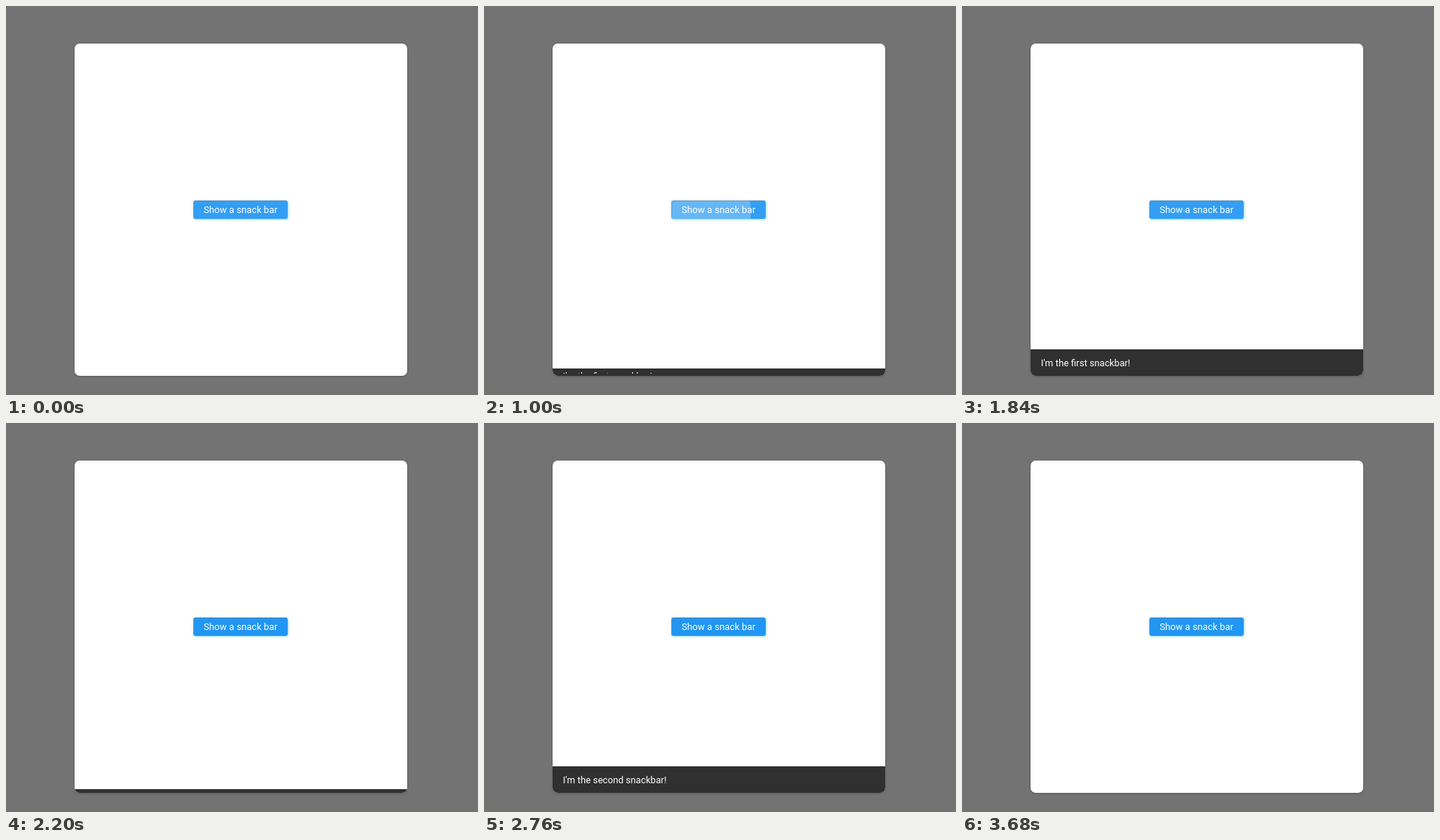
An HTML page for the animation above (4 s loop, 640 by 528 pixels).

```html
<!DOCTYPE html>
<html lang="en">
<head>
<meta charset="utf-8">
<title>Snack bar</title>
<style>
  html, body { margin: 0; width: 100%; height: 100%; overflow: hidden; }
  body { position: relative; background: #737373; font: 12.7px/15px Roboto, sans-serif; color: #fff; }
  #card {
    position: absolute; left: 93px; top: 51px; width: 451px; height: 451px;
    border-radius: 7px; background: #fff; box-shadow: 0 1px 3px rgba(0, 0, 0, .22);
  }
  #clip { position: absolute; inset: 0; border-radius: 7px; overflow: hidden; }
  #button {
    position: absolute; left: 161px; top: 213px; width: 128px; height: 25px;
    border-radius: 3px; overflow: hidden; text-align: center; line-height: 25px; font-size: 12.75px;
  }
  #glow {
    position: absolute; left: 161px; top: 213px; width: 128px; height: 25px; border-radius: 3px;
    box-shadow: 1px 1px 3px #9fe6f8, 0 0 3px rgba(110, 120, 130, .35);
  }
  #edge {
    position: absolute; inset: 0; border-radius: 3px;
    box-shadow: inset 1px 1px 0 rgba(120, 135, 150, .6);
  }
  #ripple { position: absolute; left: 48px; top: 14px; border-radius: 50%; background: #fff; }
  #label { position: absolute; inset: 0; white-space: nowrap; }
  #bar { position: absolute; left: 0; right: 0; bottom: 0; background: #303030; overflow: hidden; }
  #slot { position: absolute; left: 14px; right: 14px; top: 3.5px; bottom: 3.5px; overflow: hidden; }
  #message { position: absolute; left: 0; top: 0; white-space: nowrap; }
</style>
</head>
<body>
<div id="card">
  <div id="glow"></div>
  <div id="button">
    <div id="ripple"></div>
    <div id="edge"></div>
    <div id="label">Show a snack bar</div>
  </div>
  <div id="clip">
    <div id="bar"><div id="slot"><div id="message"></div></div></div>
  </div>
</div>
<script>
const LOOP = 4000, STEP = 40, BAR = 36, PAD = 3.5, LINE = 15;
const bars = [
  { text: "I'm the first snackbar!", enter: 946, leave: 2014 },
  { text: "I'm the second snackbar!", enter: 2230, leave: 3460 }
];
const ripples = [
  { press: 835, release: 1060, end: 1360 },
  { press: 1835, release: 1990, end: 2190 }
];
const $ = id => document.getElementById(id);
const ramp = (t, start, end) => Math.min(1, Math.max(0, (t - start) / (end - start)));
const easeOut = p => Math.sin(p * Math.PI / 2);

function drawBar(t) {
  const { text, enter, leave } = t < bars[1].enter ? bars[0] : bars[1];
  const h = BAR * (easeOut(ramp(t, enter, enter + 300)) - ramp(t, leave, leave + 216));
  $("bar").style.height = Math.max(0, h) + "px";
  $("bar").style.visibility = h > 0 ? "visible" : "hidden";
  if ($("message").textContent !== text) $("message").textContent = text;
  const y = Math.max(0, (h - LINE) / 2 - PAD);
  $("message").style.transform = `translateY(${y}px)`;
}

function drawButton(t) {
  const hover = 1 - ramp(t, 2000, 2190);
  const mix = (a, b) => Math.round(a + (b - a) * hover);
  $("button").style.background = `rgb(${mix(33, 51)}, ${mix(150, 158)}, 243)`;

  const { press, release, end } = t < 1600 ? ripples[0] : ripples[1];
  const r = Math.max(0, Math.min(92, (t - press) * .364));
  const s = $("ripple").style;
  s.width = s.height = 2 * r + "px";
  s.margin = `${-r}px 0 0 ${-r}px`;
  s.opacity = .25 * (1 - ramp(t, release, end));
}

function frame() {
  const t = Math.floor(performance.now() % LOOP / STEP) * STEP;
  drawBar(t);
  drawButton(t);
  requestAnimationFrame(frame);
}
frame();
</script>
</body>
</html>
```
